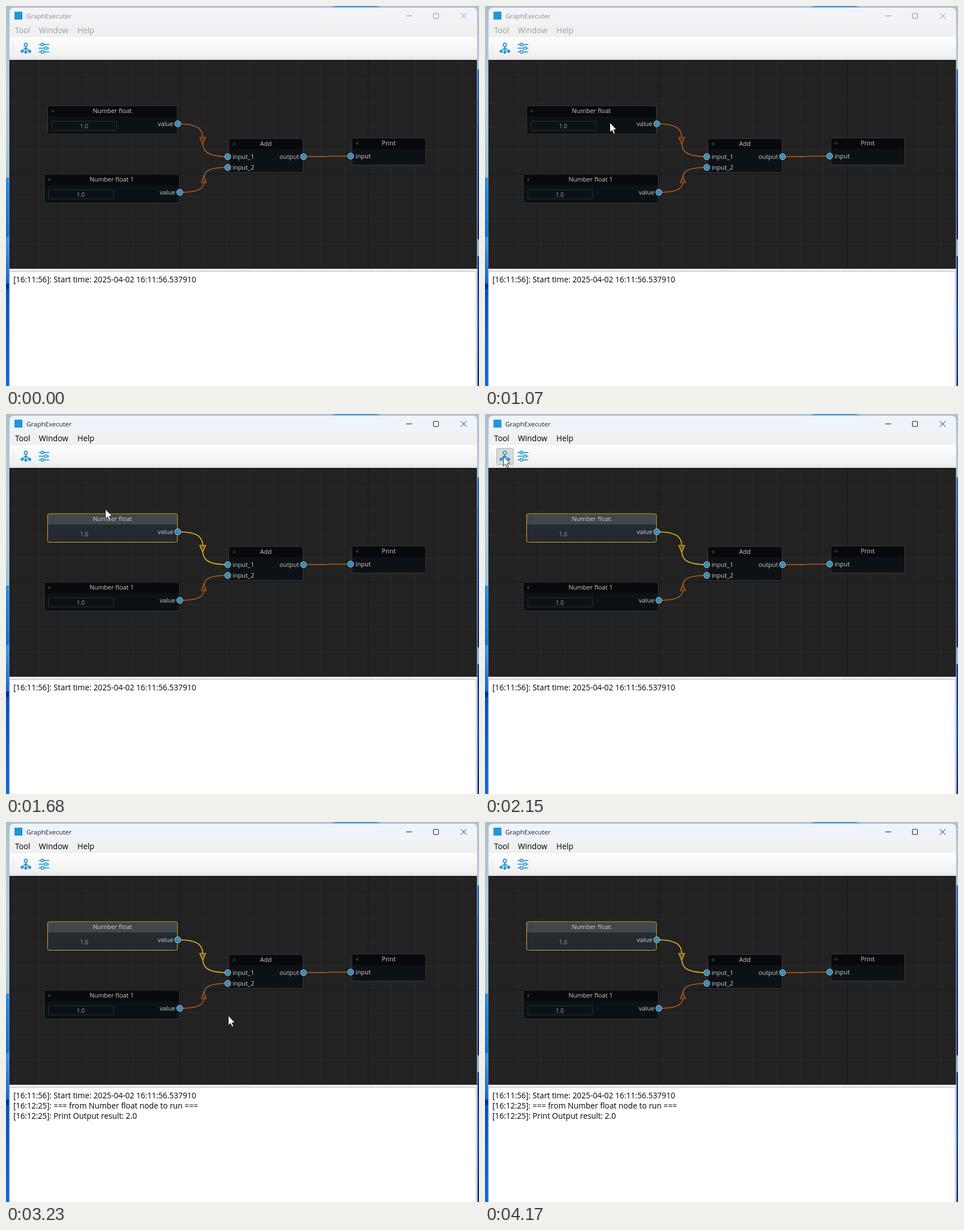
Animation of 835 by 671 pixels, one loop 5270 ms. Source, as an HTML page with a canvas:

```html
<!DOCTYPE html>
<html lang="en">
<head>
<meta charset="utf-8">
<title>GraphExecuter</title>
<style>
html, body { margin: 0; width: 100%; height: 100%; overflow: hidden; background: #fff; }
canvas { display: block; }
</style>
</head>
<body>
<canvas id="stage" width="835" height="671"></canvas>
<script>
const c = document.getElementById('stage').getContext('2d');
const LOOP = 5270;
const ACTIVE_AT = 1230, HOVER_AT = 2000, PRESS_AT = 2150, LOG_AT = 2310, LEAVE_AT = 2610, GONE_AT = 4170;
const BLUE = '#2196db', ORANGE = '#b55e1d', YELLOW = '#eab922';

// Pointer positions: start time, x, y; each one is held until the next.
const pointer = [
  [130, 574, 512], [290, 486, 414], [440, 388, 318], [600, 305, 252],
  [760, 252, 222], [910, 227, 209], [1070, 220, 206],
  [1380, 212, 200], [1540, 175, 168], [1690, 119, 126], [1850, 66, 94],
  [2000, 37, 78], [2150, 32, 75],
  [2610, 76, 108], [2770, 173, 183], [2920, 268, 247], [3080, 350, 308],
  [3230, 392, 342], [3390, 370, 353], [3540, 351, 357],
  [3700, 398, 392], [3850, 545, 490], [4010, 743, 662]
];

const logLines = [
  '[16:11:56]: Start time: 2025-04-02 16:11:56.537910',
  '[16:12:25]: === from Number float node to run ===',
  '[16:12:25]: Print Output result: 2.0'
];

const nodes = [
  { title: 'Number float', x: 73, y: 176, w: 229.5, h: 50.5, field: '1.0', outs: [['value', 208]] },
  { title: 'Number float 1', x: 67, y: 297, w: 239, h: 51, field: '1.0', outs: [['value', 329]] },
  { title: 'Add', x: 393, y: 234, w: 131.5, h: 60, ins: [['input_1', 266], ['input_2', 285]], outs: [['output', 266]] },
  { title: 'Print', x: 610, y: 233, w: 131, h: 48, ins: [['input', 265]] }
];

function rect(x, y, w, h, fill) {
  c.fillStyle = fill;
  c.fillRect(x, y, w, h);
}

function roundRect(x, y, w, h, r, fill, stroke) {
  c.beginPath();
  c.roundRect(x, y, w, h, r);
  paint(fill, stroke);
}

function paint(fill, stroke, width = 1) {
  if (fill) { c.fillStyle = fill; c.fill(); }
  if (stroke) { c.strokeStyle = stroke; c.lineWidth = width; c.stroke(); }
}

function circle(x, y, r, fill, stroke, width) {
  c.beginPath();
  c.arc(x, y, r, 0, Math.PI * 2);
  paint(fill, stroke, width);
}

function line(points, stroke, width = 1) {
  c.beginPath();
  points.forEach(([x, y]) => c.lineTo(x, y));
  paint(null, stroke, width);
}

function polygon(points, fill, stroke, width) {
  c.beginPath();
  points.forEach(([x, y]) => c.lineTo(x, y));
  c.closePath();
  paint(fill, stroke, width);
}

function text(str, x, y, size, fill, align = 'left') {
  c.font = `${size}px "Open Sans", "Noto Sans", sans-serif`;
  c.textAlign = align;
  c.fillStyle = fill;
  c.fillText(str, x, y);
}

function gradient(y0, y1, ...colors) {
  const g = c.createLinearGradient(0, y0, 0, y1);
  colors.forEach((color, i) => g.addColorStop(i / (colors.length - 1), color));
  return g;
}

function drawDesktop() {
  rect(0, 0, 835, 671, gradient(0, 310, '#a9c0d0', '#b6cbd8', '#9fbfd3'));
  c.beginPath();
  c.ellipse(618, 8, 56, 10, 0, 0, Math.PI * 2);
  paint('#2b93dc');
  rect(0, 303, 7, 105, gradient(303, 408, '#2a8fe0', '#0b74d4'));
  rect(0, 408, 7, 82, gradient(408, 490, '#3f9ce6', '#1169cf'));
  rect(0, 490, 7, 10, '#06307f');
  rect(0, 500, 7, 171, gradient(500, 671, '#0a50c4', '#1268de'));
  rect(831, 112, 4, 300, gradient(112, 412, '#1c63c8', '#0b2f9a', '#071a63'));
  rect(831, 412, 4, 30, '#8fb4d4');
  rect(831, 442, 4, 229, gradient(442, 671, '#0a2c8c', '#0d45b4', '#0a2a80'));
}

function drawTitleBar(active) {
  const ink = active ? '#151515' : '#8b8b8b';
  roundRect(6, 2.5, 826, 680, 8, active ? '#eff3fa' : '#f3f3f7', '#b9c1cb');
  roundRect(15, 10, 14, 14, 0, BLUE);
  text('GraphExecuter', 36, 22, 11.5, active ? '#222' : '#8b8b8b');
  line([[706.5, 17.5], [717, 17.5]], ink);
  roundRect(754.5, 13, 9, 9, 1, null, ink);
  line([[803, 12.5], [813, 22.5]], ink);
  line([[813, 12.5], [803, 22.5]], ink);

  rect(6.5, 33, 825, 22, '#f0f0f0');
  const menuInk = active ? '#000' : '#98a098';
  [['Tool', 16], ['Window', 58], ['Help', 126]].forEach(([s, x]) => text(s, x, 48, 13.8, menuInk));
}

function drawToolbar(t) {
  rect(6.5, 55, 825, 38, gradient(55, 93, '#fdfdfd', '#f7f7f7', '#eeeeee'));
  rect(6.5, 92, 825, 1, '#d4d4d4');
  rect(6.5, 93, 825, 2, '#f8f8f8');
  for (let y = 66; y < 83; y += 3) {
    rect(11, y, 1, 1, '#b5b5b5');
    rect(14, y + 1, 1, 1, '#c4c4c4');
  }
  if (t >= HOVER_AT && t < LEAVE_AT) {
    const pressed = t >= PRESS_AT && t < LOG_AT;
    roundRect(20.5, 60.5, 29.5, 29, 2, pressed ? '#d9d9d9' : '#e8e8e8', '#b3b3b3');
  }
  // Graph icon
  line([[35, 71], [35, 81]], BLUE, 1.8);
  line([[28.5, 80], [35, 73.5], [41.5, 80]], BLUE, 1.8);
  circle(35, 68.5, 2.8, '#f7f7f7', BLUE, 1.8);
  [[28.5, 80], [35, 81.5], [41.8, 80]].forEach(([x, y]) => circle(x, y, 2.7, BLUE));
  // Sliders icon
  [[68, 64.5], [74.5, 70.5], [81, 64.5]].forEach(([y, knob]) => {
    line([[57.5, y], [76.5, y]], BLUE, 1.7);
    circle(knob, y, 2.5, '#f7f7f7', BLUE, 1.6);
  });
}

function drawGrid() {
  rect(6, 95, 825.5, 369, '#222222');
  const cell = 41.5;
  for (let i = -7; i <= 12; i++) {
    rect(Math.round(306.5 + i * cell), 95, 1, 369, i % 8 ? '#292929' : '#151515');
  }
  for (let i = -4; i <= 4; i++) {
    rect(6, Math.round(295.5 + i * cell), 825.5, 1, i % 8 ? '#292929' : '#151515');
  }
}

function drawWire(x0, y0, x1, y1, color, arrow, fill) {
  c.beginPath();
  c.moveTo(x0, y0);
  c.bezierCurveTo(x1, y0, x0, y1, x1, y1);
  paint(null, color, 1.6);
  if (!arrow) return;
  const x = (x0 + x1) / 2, y = (y0 + y1) / 2;
  const d = Math.sign(y1 - y0), half = d > 0 ? 5.3 : 4.5;
  polygon([[x - half, y - 5 * d], [x + half, y - 5 * d], [x, y + 7 * d]], fill, color, 1.2);
}

function drawPort(x, y) {
  circle(x, y, 5, '#14242f', '#a5d2ea', 1.4);
  circle(x, y, 3.5, '#2c9bd3');
}

function drawNode(n, selected) {
  const { x, y, w, h } = n;
  const ink = '#cfcfcf', size = 11.05;
  roundRect(x + .5, y, w - .5, h, 3, selected ? '#252a30' : '#0c1115');
  roundRect(x + 1, y + 1, w - 2, 18, [2, 2, 0, 0], selected ? '#41484c' : '#07090d');
  roundRect(x + .5, y, w - .5, h, 3, null, selected ? '#d9ac24' : '#353b40');
  circle(x + 9.7, y + 9.5, 2.5, selected ? '#384045' : '#2c2e30');
  text(n.title, x + w / 2, y + 12.8, size, ink, 'center');
  if (n.field) {
    if (!selected) roundRect(x + 8.5, y + 27.5, 114, 16, 1, null, '#2d3238');
    text(n.field, x + 65, y + 39.5, 10.3, '#a2a2a2', 'center');
  }
  (n.ins || []).forEach(([label, py]) => {
    text(label, x + 7, py + 4.3, size, ink);
    drawPort(x - 1.5, py);
  });
  (n.outs || []).forEach(([label, py]) => {
    text(label, x + w - 7, py + 4.2, size, ink, 'right');
    drawPort(x + w + .7, py);
  });
}

function drawGraph(active) {
  drawGrid();
  drawWire(303, 208, 391.5, 266, active ? YELLOW : ORANGE, true, active ? '#6e5a1c' : '#5a3217');
  drawWire(307, 329, 391.5, 285, ORANGE, true, '#5a3217');
  drawWire(525, 266, 608.5, 265.2, ORANGE);
  nodes.forEach((n, i) => drawNode(n, active && i === 0));
}

function drawLog(t) {
  rect(6.5, 464, 825, 5, '#f1eef0');
  for (let x = 415; x < 430; x += 3) rect(x, 466, 1, 1, '#bdbdbd');
  rect(6.5, 468, 825, 203, '#b9b9bd');
  rect(7, 469, 822.5, 202, '#fff');
  rect(830.5, 468, 1, 203, '#f0f0f0');
  const count = t >= LOG_AT ? 3 : 1;
  logLines.slice(0, count).forEach((s, i) => text(s, 13, 488.3 + i * 17.7, 13.8, '#000'));
}

function drawPointer(t) {
  if (t >= GONE_AT) return;
  const step = pointer.findLast(p => p[0] <= t);
  if (!step) return;
  const [start, x, y] = step;
  c.save();
  c.translate(x, y);
  if (y > 469 || start === 2770) {
    c.globalCompositeOperation = 'difference';
    line([[-4, -8.5], [-1, -8.5], [0, -7.5], [1, -8.5], [4, -8.5]], '#ddd');
    line([[-4, 8.5], [-1, 8.5], [0, 7.5], [1, 8.5], [4, 8.5]], '#ddd');
    line([[0, -7.5], [0, 7.5]], '#ddd', 1.2);
  } else {
    polygon([[.5, 0], [.5, 17], [4.3, 13.5], [7, 19.6], [9.6, 18.5], [7, 12.6], [12, 12]],
      '#fff', '#1a1a1a', .9);
  }
  c.restore();
}

function draw(now) {
  const t = now % LOOP, active = t >= ACTIVE_AT;
  drawDesktop();
  drawTitleBar(active);
  drawToolbar(t);
  drawGraph(active);
  drawLog(t);
  drawPointer(t);
}

const begin = performance.now();
function tick() {
  draw(performance.now() - begin);
  requestAnimationFrame(tick);
}
tick();
</script>
</body>
</html>
```
